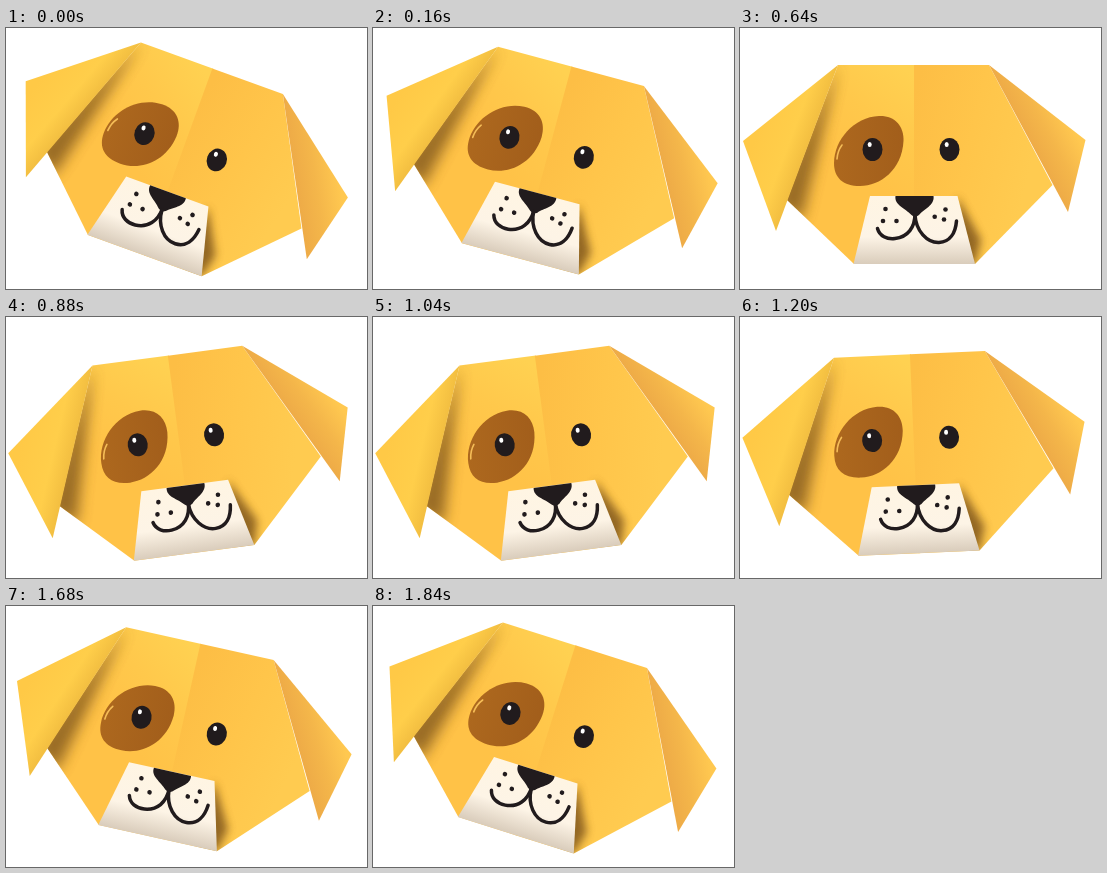
An HTML page for the animation above (1920 ms loop, 361 by 261 pixels).

```html
<!DOCTYPE html>
<html lang="en">
<head>
<meta charset="utf-8">
<title>Paper dog</title>
<style>
  html, body { margin: 0; width: 100%; height: 100%; overflow: hidden; background: #fff; }
  svg { display: block; width: 100vw; height: 100vh; }
</style>
</head>
<body>
<svg viewBox="0 0 361 261">
  <defs>
    <linearGradient id="leftFace" gradientUnits="userSpaceOnUse" x1="105" y1="135" x2="170" y2="45">
      <stop offset="0" stop-color="#ffc247"/>
      <stop offset=".5" stop-color="#ffc84b"/>
      <stop offset="1" stop-color="#ffd151"/>
    </linearGradient>
    <linearGradient id="rightFace" gradientUnits="userSpaceOnUse" x1="174" x2="300" y1="70" y2="100">
      <stop offset="0" stop-color="#fdbe45"/>
      <stop offset=".5" stop-color="#ffc54a"/>
      <stop offset="1" stop-color="#ffcb50"/>
    </linearGradient>
    <linearGradient id="leftEar" gradientUnits="userSpaceOnUse" x1="19" y1="100" x2="67" y2="118">
      <stop offset="0" stop-color="#ffc946"/>
      <stop offset=".65" stop-color="#ffce4a"/>
      <stop offset="1" stop-color="#f3bf41"/>
    </linearGradient>
    <linearGradient id="rightEar" gradientUnits="userSpaceOnUse" x1="288" y1="110" x2="327" y2="89">
      <stop offset="0" stop-color="#eeab47"/>
      <stop offset=".45" stop-color="#f4b64a"/>
      <stop offset="1" stop-color="#ffc850"/>
    </linearGradient>
    <linearGradient id="muzzle" x1="0" y1="0" x2="0" y2="1">
      <stop offset="0" stop-color="#fff5e3"/>
      <stop offset=".6" stop-color="#fdf4e6"/>
      <stop offset="1" stop-color="#d9ccbb"/>
    </linearGradient>
    <linearGradient id="patch" x1="0" y1="0" x2="1" y2="0">
      <stop offset="0" stop-color="#ad681e"/>
      <stop offset="1" stop-color="#a25e1b"/>
    </linearGradient>
    <filter id="softWide" x="-50%" y="-50%" width="200%" height="200%"><feGaussianBlur stdDeviation="7"/></filter>
    <filter id="softNarrow" x="-50%" y="-50%" width="200%" height="200%"><feGaussianBlur stdDeviation="4"/></filter>
    <clipPath id="faceClip"><path d="M98 37H249L312.500 157L235 236H114L47 172Z"/></clipPath>
    <g id="eye">
      <ellipse rx="10" ry="11.500" fill="#211b1d"/>
      <ellipse cx="-2.800" cy="-5" rx="2" ry="2.500" fill="#fff"/>
    </g>
  </defs>

  <g id="head">
    <path d="M98 37H175V236H114L47 172Z" fill="url(#leftFace)"/>
    <path d="M174 37H249L312.500 157L235 236H174Z" fill="url(#rightFace)"/>
    <g clip-path="url(#faceClip)" fill="#80561a">
      <path d="M98 37L34 176L62 192Z" opacity=".8" filter="url(#softWide)"/>
      <path d="M217 168L241 212L235 236H215Z" opacity=".85" filter="url(#softNarrow)"/>
    </g>
    <path d="M98 37L3 113L36 203Z" fill="url(#leftEar)"/>
    <path d="M249 37L345.500 112L328 184Z" fill="url(#rightEar)"/>

    <path d="M94 135C94 112 114 89 139 88C155 87.500 164 98 163.500 113C162 142 140 158 120 158C103 158 94 150 94 135Z" fill="url(#patch)"/>
    <path d="M97 131Q97.500 123 102 117" fill="none" stroke="#f5bd58" stroke-width="1.600" stroke-linecap="round"/>
    <use href="#eye" x="132.500" y="121.500"/>
    <use href="#eye" x="209.500" y="121.500"/>

    <path d="M130 168H217.500L235 236H113.500Z" fill="url(#muzzle)"/>
    <path d="M155.500 168H193.500C195 177 184 181 179 187Q175 190 171.500 187C165 180 154 177 155.500 168Z" fill="#211b1d"/>
    <g fill="none" stroke="#211b1d" stroke-width="3.500" stroke-linecap="round" stroke-linejoin="round">
      <path d="M137.500 200.500C139.500 208 147 211.500 155 210.500C168 209 175 199 175 186"/>
      <path d="M175 187C176 203 187 215 199 214.500C210 214 215.500 205 216.500 193"/>
    </g>
    <g id="freckles" fill="#211b1d"></g>
  </g>
</svg>
<script>
  const STEP_MS = 80, STEPS = 24, TILT_MAX = 20, TILT_RANGE = 30;
  const head = document.getElementById("head");
  const freckles = [[145.5, 181], [143, 193], [156.5, 193], [205.5, 181.5], [194.7, 188.7], [204, 191.5]];

  document.getElementById("freckles").innerHTML = freckles
    .map(([x, y]) => `<circle cx="${x}" cy="${y}" r="2.3"/>`).join("");

  // The head swings at a constant rate between +20 and -10 degrees.
  function draw(ms) {
    const step = Math.floor(ms / STEP_MS) % STEPS;
    const swing = Math.min(step, STEPS - step) / (STEPS / 2);
    head.setAttribute("transform", `rotate(${TILT_MAX - TILT_RANGE * swing} 180.5 130.5)`);
  }

  let start;
  function tick(now) {
    start ??= now;
    draw(now - start);
    requestAnimationFrame(tick);
  }
  draw(0);
  requestAnimationFrame(tick);
</script>
</body>
</html>
```
